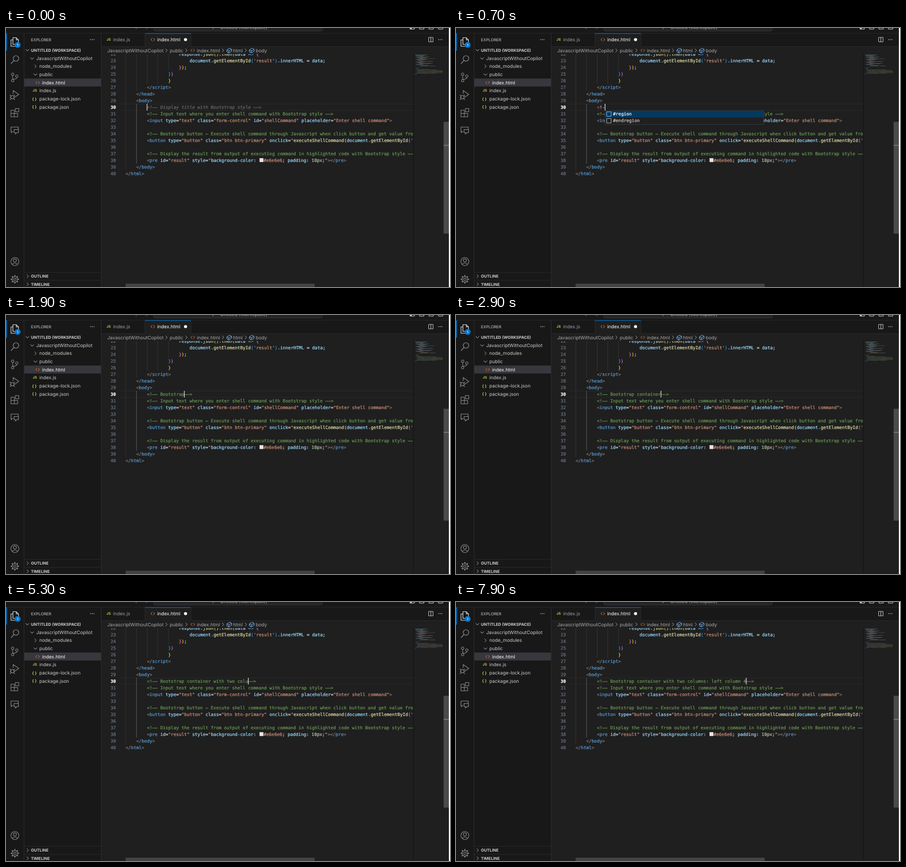
Animation of 800x468 px, one loop 8000 ms. Source, as an HTML page with a canvas:

```html
<!DOCTYPE html>
<html lang="en">
<head>
<meta charset="utf-8">
<title>Typing a comment in a code editor</title>
<style>
html, body { margin: 0; width: 800px; height: 468px; overflow: hidden; background: #181818; }
canvas { display: block; }
</style>
</head>
<body>
<canvas id="stage" width="800" height="468"></canvas>
<script>
const ctx = document.getElementById('stage').getContext('2d');
const LOOP = 8000, CODE_SIZE = 7.975, CHAR = CODE_SIZE * 0.602, LINE = 12;
const CODE_X = 215.5, CODE_RIGHT = 733, WINDOW_RIGHT = 798;
const UI = 'Inter, sans-serif', MONO = '"DejaVu Sans Mono", monospace';

const COLORS = {
  c: '#6a9955', k: '#808080', b: '#569cd6', a: '#9cdcfe', s: '#ce9178', f: '#dcdcaa',
  w: '#cccccc', n: '#b5cea8', 1: '#ffd700', 2: '#da70d6', 3: '#179fff', r: '#f44747', g: '#6b6b68'
};

// Line number, indent, then tokens: a colour key followed by the text.
const CODE = [
  [22, 20, 'aresponse|w.|fjson|1()|w.|fthen|1(|adata|b =>|2 {'],
  [23, 24, 'adocument|w.|fgetElementById|3(|s\'result\'|3)|w.|ainnerHTML|w = |adata|w;'],
  [24, 20, '2}|1)|w;'],
  [25, 16, '3}|2)'],
  [26, 16, '1}'],
  [27, 8, 'k</|bscript|k>'],
  [28, 4, 'k</|bhead|k>'],
  [29, 4, 'k<|bbody|k>'],
  [31, 8, 'c<!-- Input text where you enter shell command with Bootstrap style -->'],
  [32, 8, 'k<|binput|a type|w=|s"text"|a class|w=|s"form-control"|a id|w=|s"shellCommand"|a placeholder|w=|s"Enter shell command"|k>'],
  [34, 8, 'c<!-- Bootstrap button - Execute shell command through Javascript when click button and get value from input -->'],
  [35, 8, 'k<|bbutton|a type|w=|s"button"|a class|w=|s"btn btn-primary"|a onclick|w=|s"|fexecuteShellCommand|1(|adocument|w.|fgetElementById|2(|s\''],
  [37, 8, 'c<!-- Display the result from output of executing command in highlighted code with Bootstrap style -->'],
  [38, 8, 'k<|bpre|a id|w=|s"result"|a style|w=|s"|abackground-color|w: '],
  [38, 51.8, 's#e6e6e6|w; |apadding|w: |n10px|w;|s"|k></|bpre|k>'],
  [39, 4, 'k</|bbody|k>'],
  [40, 0, 'k</|bhtml|k>']
];

// Runs of keystrokes, one key every 100 ms from the start time; \b deletes.
const RUNS = [
  [300, '<'], [600, '!-- '], [1100, 'Boot'], [1600, 's'], [1600, 'trap container with two col'],
  [4400, 'uns: \b\b\b'], [5300, '\bmns'], [5800, ':'], [6000, ' '], [6000, 'left colu'],
  [7000, 'm'], [7200, 'n '], [7900, '4']
];

function typedAt(t) {
  let text = '';
  for (const [start, keys] of RUNS)
    [...keys].forEach((key, i) => {
      if (t >= start + i * 100) text = key === '\b' ? text.slice(0, -1) : text + key;
    });
  return text;
}

function rect(x, y, w, h, color) {
  ctx.fillStyle = color;
  ctx.fillRect(x, y, w, h);
}

function label(text, x, y, color = '#cccccc', size = 8.5, weight = 400, family = UI) {
  ctx.font = `${weight} ${size}px ${family}`;
  ctx.fillStyle = color;
  ctx.fillText(text, x, y + size * 0.36);
}

// Code is drawn slightly heavier than the plain font.
function codeLabel(text, x, y, color, weight = 400) {
  label(text, x, y, color, CODE_SIZE, weight, MONO);
  ctx.strokeStyle = color;
  ctx.lineWidth = 0.2;
  ctx.strokeText(text, x, y + CODE_SIZE * 0.36);
}

function stroke(path, color = '#868686', width = 1) {
  ctx.strokeStyle = color;
  ctx.lineWidth = width;
  ctx.stroke(new Path2D(path));
}

function disc(x, y, r, color) {
  ctx.fillStyle = color;
  ctx.beginPath();
  ctx.arc(x, y, r, 0, 7);
  ctx.fill();
}

const ring = (x, y, r) => `M${x - r} ${y}a${r} ${r} 0 1 0 ${2 * r} 0a${r} ${r} 0 1 0 ${-2 * r} 0`;
const dots = (x, y) => [-3, 0, 3].forEach(d => disc(x + d, y, 0.8, '#cccccc'));
const right = (x, y) => stroke(`M${x - 1.5} ${y - 3}l3 3l-3 3`, '#b0b0b0', 0.9);
const down = (x, y) => stroke(`M${x - 3} ${y - 1.5}l3 3l3 -3`, '#cccccc', 0.9);
const tagIcon = (x, y) => stroke(`M${x - 1} ${y - 2.5}l-2.5 2.5l2.5 2.5M${x + 1} ${y - 2.5}l2.5 2.5l-2.5 2.5`, '#e37933', 1);
const jsIcon = (x, y) => label('JS', x, y, '#cbcb41', 6.3, 700);
const jsonIcon = (x, y) => label('{ }', x, y, '#cbcb41', 7, 700);
const cube = (x, y) => stroke(`M${x - 4} ${y - 1}l5 -3l3.5 2v3.5l-5 3l-3.5 -2zl3.5 2l5 -3m-5 3v3.5`, '#75beff', 0.9);

function activityBar() {
  rect(32, 9, 1, 459, '#2b2b2b');
  rect(0, 9, 1.5, 32, '#0078d4');
  stroke('M12.5 17.5h6l4 4v8h-10zM18.5 17.5v4h4M12.5 21.5h-3.5v11.5h9.5v-3', '#d7d7d7', 1.1);
  disc(21, 30.5, 5.3, '#0078d4');
  label('1', 19.4, 30.5, '#ffffff', 6, 600);
  stroke(ring(18, 55, 5) + 'M14.5 58.5l-5.5 6', undefined, 1.2);
  stroke(ring(12, 83.5, 2.2) + ring(12, 95, 2.2) + ring(19.5, 87, 2.2) + 'M12 86v6.5M19.5 89.5q0 3 -7 3', undefined, 1.1);
  stroke('M13 119v-6l10 7l-8 5.5' + ring(11.5, 125, 3) + 'M7 121l2.5 2M7 125.5h1.5M7 129.5l2.5 -2M16 121l-2.5 2M16 129.5l-2.5 -2', undefined, 1.1);
  stroke('M9 148.5h6v12h-6zM9 154.5h12v6h-12M17 145.5h6v6h-6z', undefined, 1.1);
  stroke('M13 187h-1.5l-2 2v-2h-0.5v-8h13v4M14.5 183.5h8v5.5h-3l-2.5 2.5v-2.5h-2.5z', undefined, 1.1);
  stroke(ring(16, 422, 7.2) + ring(16, 420, 2.8) + 'M11 427q5 -5 10 0', undefined, 1.1);
  stroke(ring(16, 454, 2.2) + ring(16, 454, 5), undefined, 1.1);
  for (let i = 0; i < 8; i++) {
    const x = Math.cos(i * Math.PI / 4), y = Math.sin(i * Math.PI / 4);
    stroke(`M${16 + 5 * x} ${454 + 5 * y}L${16 + 7.4 * x} ${454 + 7.4 * y}`, undefined, 2);
  }
}

function sidebar() {
  rect(171, 9, 1, 459, '#2b2b2b');
  label('EXPLORER', 45, 21, '#cccccc', 7.2);
  dots(155.5, 21);
  down(38.5, 40);
  label('UNTITLED (WORKSPACE)', 45, 40, '#cccccc', 7.25, 700);
  rect(33, 91.3, 138, 14.4, '#37373d');
  down(47, 55);
  label('JavascriptWithoutCopilot', 54.5, 54.7);
  right(53, 69.3);
  label('node_modules', 60, 69.3);
  down(53, 84);
  label('public', 60, 84);
  tagIcon(57, 98.7);
  label('index.html', 65, 98.5, '#ffffff');
  jsIcon(48, 113);
  label('index.js', 60, 113);
  ['package-lock.json', 'package.json'].forEach((name, i) => {
    jsonIcon(47, 128 + i * 14.5);
    label(name, 60, 128 + i * 14.5);
  });
  ['OUTLINE', 'TIMELINE'].forEach((name, i) => {
    rect(33, 441 + i * 14.5, 138, 0.8, '#2b2b2b');
    right(39, 448.5 + i * 14.5);
    label(name, 45, 448.5 + i * 14.5, '#cccccc', 7.2, 700);
  });
}

function header() {
  ctx.fillStyle = '#242424';
  ctx.beginPath();
  ctx.roundRect(266, -10, 304, 15.5, 4);
  ctx.fill();
  stroke('M266 0v2q0 3.5 3.5 3.5h297q3.5 0 3.5 -3.5v-2', '#3a3a3a', 0.8);
  label('Untitled (Workspace)', 386, -1, '#a8a8a8');
  stroke('M233 -1l2 2.5M253 1.5l2 -2.5M374 0l-1.5 2', '#9d9d9d');
  [728, 745, 762, 779].forEach(x => stroke(`M${x} -3v5h8v-5`, '#cccccc', 1));
  rect(728, -1, 3, 3, '#cccccc');

  rect(0, 9, 800, 0.7, '#2b2b2b');
  rect(172, 33, 628, 0.7, '#2b2b2b');
  rect(250, 9, 83, 25, '#1f1f1f');
  rect(250, 9, 0.8, 24, '#2b2b2b');
  rect(333, 9, 0.8, 24, '#2b2b2b');
  rect(250.5, 9.4, 82.5, 1, '#0078d4');
  jsIcon(181, 21);
  label('index.js', 193, 21, '#9d9d9d');
  tagIcon(264.5, 21);
  label('index.html', 272.5, 21, '#ffffff');
  disc(323.5, 21, 2.8, '#ffffff');
  stroke('M761.5 17h8v8h-8zM765.5 17v8', '#cccccc', 0.9);
  dots(782.5, 21);

  const crumb = '#a9a9a9';
  label('JavascriptWithoutCopilot', 182.5, 40.5, crumb);
  label('public', 295, 40.5, crumb);
  label('index.html', 344, 40.5, crumb);
  label('html', 409, 40.5, crumb);
  label('body', 450, 40.5, crumb);
  [289, 325, 391, 432].forEach(x => right(x, 40.5));
  tagIcon(336.5, 40.5);
  cube(402, 40.5);
  cube(442.5, 40.5);
}

const lineY = n => 143 + (n - 30) * LINE;
const colX = col => CODE_X + col * CHAR;

function tokens(source, col, paint) {
  for (const token of source.split('|')) {
    // Comments show their hyphens as wide, touching dashes.
    const text = 'cg'.includes(token[0]) ? token.slice(1).replaceAll('-', '–') : token.slice(1);
    paint(text, col, COLORS[token[0]]);
    col += text.length;
  }
}

function guides() {
  const guide = (col, from, to, color = '#383838') =>
    rect(colX(col), lineY(from) - 6, 0.8, (to - from + 1) * LINE, color);
  guide(0, 22, 39);
  guide(4, 22, 27);
  guide(8, 22, 26);
  guide(12, 22, 26);
  guide(16, 22, 24);
  guide(4, 30, 38, '#686868');
}

function minimap(lines) {
  const bar = (n, col, len, color) => rect(736 + col * 0.5, 47.3 + n * 0.9, len * 0.5, 0.65, color);
  ctx.save();
  ctx.beginPath();
  ctx.rect(735, 40, 52, 60);
  ctx.clip();
  ctx.globalAlpha = 0.38;
  for (let n = 1; n < 22; n++) {
    const indent = n < 4 ? n * 2 : 4 + n % 5 * 4;
    bar(n, indent, 8 + n * 37 % 48, n % 3 ? COLORS.a : COLORS.s);
  }
  for (const [n, indent, source] of lines)
    tokens(source, indent, (text, col, color) => bar(n, col, text.length, color));
  ctx.restore();
}

function suggestions() {
  rect(268.5, 149, 286, 25.5, '#454545');
  rect(269.2, 149.6, 284.6, 24.2, '#202020');
  rect(269.2, 149.6, 284.6, 12, '#04395e');
  ['#region', '#endregion'].forEach((name, i) => {
    const y = 155.5 + i * LINE;
    stroke(`M271.5 ${y - 4}h8v8h-8z`, i ? '#b5b5b5' : '#75beff', 0.9);
    codeLabel(name, 283, y, i ? '#cccccc' : '#ffffff');
  });
}

function editor(t) {
  const typed = typedAt(t);
  const open = typed.length < 4;
  const current = !typed ? 'g<!-- Display title with Bootstrap style -->'
    : open ? 'r<|w' + typed.slice(1)
    : 'c' + typed + '-->';
  const lines = [...CODE, [30, 8, current]];

  ctx.save();
  ctx.beginPath();
  ctx.rect(172, 47, CODE_RIGHT - 172, 415);
  ctx.clip();
  rect(205, 136.8, 530, 0.8, '#2b2b2b');
  rect(205, 148.4, 530, 0.8, '#2b2b2b');
  guides();
  for (let n = 22; n <= 40; n++)
    codeLabel(n, 188.4, lineY(n), n === 30 ? '#ffffff' : '#6e7681', n === 30 ? 700 : 400);
  for (const [n, indent, source] of lines) {
    const style = n === 30 && !typed ? 'italic 400' : 400;
    tokens(source, indent, (text, col, color) => codeLabel(text, colX(col), lineY(n), color, style));
  }
  rect(456.8, 235.2, 7, 7, '#e6e6e6');

  ctx.globalAlpha = t < 7500 || t >= 7800 ? 1 : t < 7600 ? 0.5 : 0;
  rect(colX(8 + typed.length) - 0.4, 137, 1.3, 12, '#d0d0d0');
  ctx.restore();

  rect(CODE_RIGHT, 47, 1.5, 421, '#161616');
  minimap(lines);
  rect(788.5, 169.5, 11.5, 202, '#4b4b4b');
  rect(788.5, 211.5, 11.5, 1.2, '#8a8a8a');
  rect(215.5, 462, 340.5, 6, '#434343');
  if (t >= 700 && t < 800) suggestions();
}

function draw(now) {
  ctx.textRendering = 'geometricPrecision';
  rect(0, 0, 800, 468, '#181818');
  rect(172, 33, 628, 435, '#1f1f1f');
  activityBar();
  sidebar();
  header();
  editor(now % LOOP);
  rect(WINDOW_RIGHT, 0, 800 - WINDOW_RIGHT, 468, '#ffffff');
  requestAnimationFrame(draw);
}
requestAnimationFrame(draw);
</script>
</body>
</html>
```
